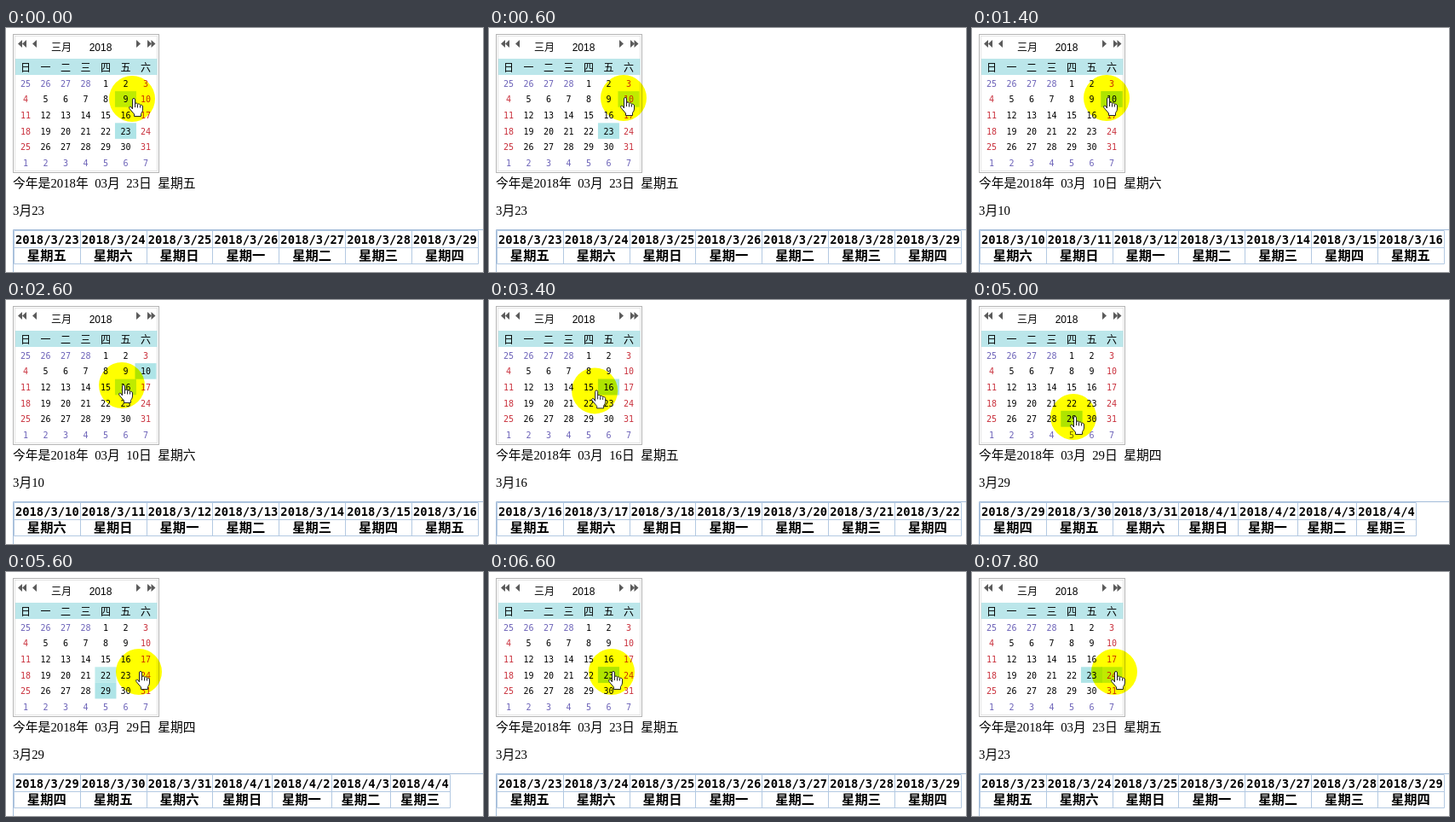
An HTML page for the animation above (8000 ms loop, 560 by 286 pixels).

```html
<!DOCTYPE html>
<html lang="zh-CN">
<head>
<meta charset="utf-8">
<title>日历</title>
<style>
html, body { margin: 0; width: 100%; height: 100%; overflow: hidden; background: #fff; }
svg { display: block; width: 560px; height: 286px; isolation: isolate; }
text { font-family: "Liberation Serif", "Noto Sans CJK SC", serif; white-space: pre; }
.info { font-size: 14.8px; }
.head { font-size: 12px; text-anchor: middle; }
.day { font: 10px "DejaVu Sans Mono", monospace; text-anchor: middle; }
.year { font: 12px "Liberation Sans", sans-serif; text-anchor: middle; }
.date { font: bold 13.8px "DejaVu Sans Mono", monospace; text-anchor: middle; }
.week { font-size: 15.3px; font-weight: bold; text-anchor: middle; }
.picked { fill: #000; }
.spot { fill: #ff0; mix-blend-mode: multiply; }
</style>
</head>
<body>
<svg id="stage" viewBox="0 0 560 286"></svg>
<script>
const LOOP = 8000, TICK = 200, CLICK_DELAY = 400;
const WEEK = '日一二三四五六';
const LEFT = 11.2, TOP = 55.5, COL = 23.5, ROW = 18.6;
const BOW = 8;

// The pointer glides from stop to stop; some stops end in a click
const FIRST = { arrive: 0, x: 148, y: 83 }, FIRST_DAY = 23;
const STOPS = [
  { leave: 0, arrive: 600, x: 158, y: 82, click: true },
  { leave: 1800, arrive: 2400, x: 136, y: 100, click: true },
  { leave: 3000, arrive: 3600, x: 120, y: 118, click: true },
  { leave: 4200, arrive: 4600, x: 119, y: 137, click: true },
  { leave: 5200, arrive: 5400, x: 120, y: 121 },
  { leave: 5400, arrive: 5600, x: 156, y: 117 },
  { leave: 5600, arrive: 5800, x: 48, y: 102 },
  { leave: 5800, arrive: 6200, x: 144, y: 117, click: true },
  { leave: 7000, arrive: 7200, x: 47, y: 101 },
  { leave: 7200, arrive: 7600, x: 167, y: 117 }
];

const stage = document.getElementById('stage');
const set = (el, attrs) => { for (const k in attrs) el.setAttribute(k, attrs[k]); };

function add(tag, attrs, text, parent = stage) {
  const el = document.createElementNS('http://www.w3.org/2000/svg', tag);
  set(el, attrs);
  if (text !== undefined) el.textContent = text;
  parent.append(el);
  return el;
}
const line = (d, stroke, parent) => add('path', { d, stroke, fill: 'none' }, undefined, parent);

const weekday = day => WEEK[(day + 3) % 7];
const midX = col => LEFT + COL * (col + 0.5);
const rowY = cell => TOP + ROW * Math.floor(cell / 7);
const cellAt = ({ x, y }) => Math.floor((y - TOP) / ROW) * 7 + Math.floor((x + 2 - LEFT) / COL);

// Calendar frame and heading
add('rect', { x: 8.5, y: 7.5, width: 171, height: 162, fill: '#fff', stroke: '#b4b4b4' });
add('rect', { x: 10.5, y: 9.5, width: 167, height: 158, fill: 'none', stroke: '#e4e4e4' });
add('rect', { x: 11, y: 36, width: 166.5, height: 19, fill: '#bbe6ea' });

const arrow = (x, dir) => add('path', { d: `M${x} 18.5l${5 * dir} -4.5v9z`, fill: '#5a5a5a' });
[14, 19, 31].forEach(x => arrow(x, 1));
[158, 171, 175.5].forEach(x => arrow(x, -1));
add('text', { class: 'head', x: 65, y: 27 }, '三月');
add('text', { class: 'year', x: 111, y: 27 }, '2018');
[...WEEK].forEach((w, i) => add('text', { class: 'head', x: midX(i), y: 51 }, w));

// Cell marks and days
const mark = fill => add('rect', { width: 25, height: ROW, fill });
const hover = mark('#bfebec'), chosen = mark('#aee4e7');
const place = (el, cell) => set(el, { x: midX(cell % 7) - 12.5, y: rowY(cell) });

const days = Array.from({ length: 42 }, (_, i) => {
  const day = i - 3, col = i % 7;
  const inMonth = day > 0 && day < 32;
  return add('text', {
    class: 'day', x: midX(col), y: rowY(i) + 13.2,
    fill: !inMonth ? '#6c62b8' : col % 6 ? '#000' : '#c9303c'
  }, day < 1 ? day + 28 : day > 31 ? day - 31 : day);
});

// Text lines and week table
const today = add('text', { class: 'info', x: 8, y: 187 });
const short = add('text', { class: 'info', x: 8, y: 219 });
line('M560 236.5H8.5V286', '#a3bcd9');
const table = add('g', {});

function drawTable(day) {
  table.replaceChildren();
  let x = 9.4, edges = '';
  for (let d = day; d < day + 7; d++) {
    const date = d > 31 ? `2018/4/${d - 31}` : `2018/3/${d}`;
    const width = 3.6 + 8.25 * date.length, mid = x + width / 2;
    add('text', { class: 'date', x: mid, y: 253 }, date, table);
    add('text', { class: 'week', x: mid - 0.5, y: 272 }, '星期' + weekday(d), table);
    x += width;
    edges += `M${Math.floor(x) + 0.5} 238V276.5`;
  }
  const end = Math.floor(x) + 0.5;
  line(`${edges}M9.5 276.5V237.5H${end}M9.5 257.5H${end}M9.5 276.5H${end}`, '#b3c9e2', table);
}

// Pointer
const spot = add('circle', { class: 'spot', r: 27 });
const hand = add('g', {});
add('path', {
  d: 'M4.5 13V2Q4.5.5 6 .5T7.5 2V7Q8 5.8 9.2 6T10.5 7.5Q11 6.6 12.2 7T13.5 8.5' +
     'Q14 7.8 15.2 8.3T16.5 10V14Q16.5 16 14.5 18.5V21.5H6.5V19L1 12.5Q0 10.5 1.5 10T4.5 13Z',
  fill: '#fff', stroke: '#222', 'stroke-linejoin': 'round'
}, undefined, hand);
line('M7.5 7V11M10.5 8V11.5M13.5 9V11.5', '#222', hand);

function pointAt(t) {
  let from = FIRST;
  for (const to of STOPS) {
    if (t <= to.leave) break;
    if (t < to.arrive) {
      const k = (t - to.leave) / (to.arrive - to.leave), ease = k * k * (3 - 2 * k);
      return {
        x: from.x + (to.x - from.x) * ease,
        y: from.y + (to.y - from.y) * ease - BOW * Math.sin(Math.PI * k)
      };
    }
    from = to;
  }
  return from;
}

function dayAt(t) {
  const last = STOPS.filter(s => s.click && s.arrive + CLICK_DELAY <= t).pop();
  return last ? cellAt(last) - 3 : FIRST_DAY;
}

function showDay(day) {
  place(chosen, day + 3);
  days.forEach((el, i) => el.classList.toggle('picked', i === day + 3));
  today.textContent = `今年是2018年  03月  ${day}日  星期${weekday(day)}`;
  short.textContent = `3月${day}`;
  drawTable(day);
}

let shown;
function render(t) {
  const { x, y } = pointAt(t);
  set(spot, { cx: x, cy: y });
  set(hand, { transform: `translate(${x - 4} ${y - 1})` });
  // The hover mark trails the pointer by one tick
  place(hover, cellAt(pointAt(t - TICK)));
  const day = dayAt(t);
  if (day !== shown) showDay(shown = day);
}

const start = performance.now();
function frame() {
  const t = (performance.now() - start) % LOOP;
  render(Math.floor(t / TICK) * TICK);
  requestAnimationFrame(frame);
}
frame();
</script>
</body>
</html>
```
